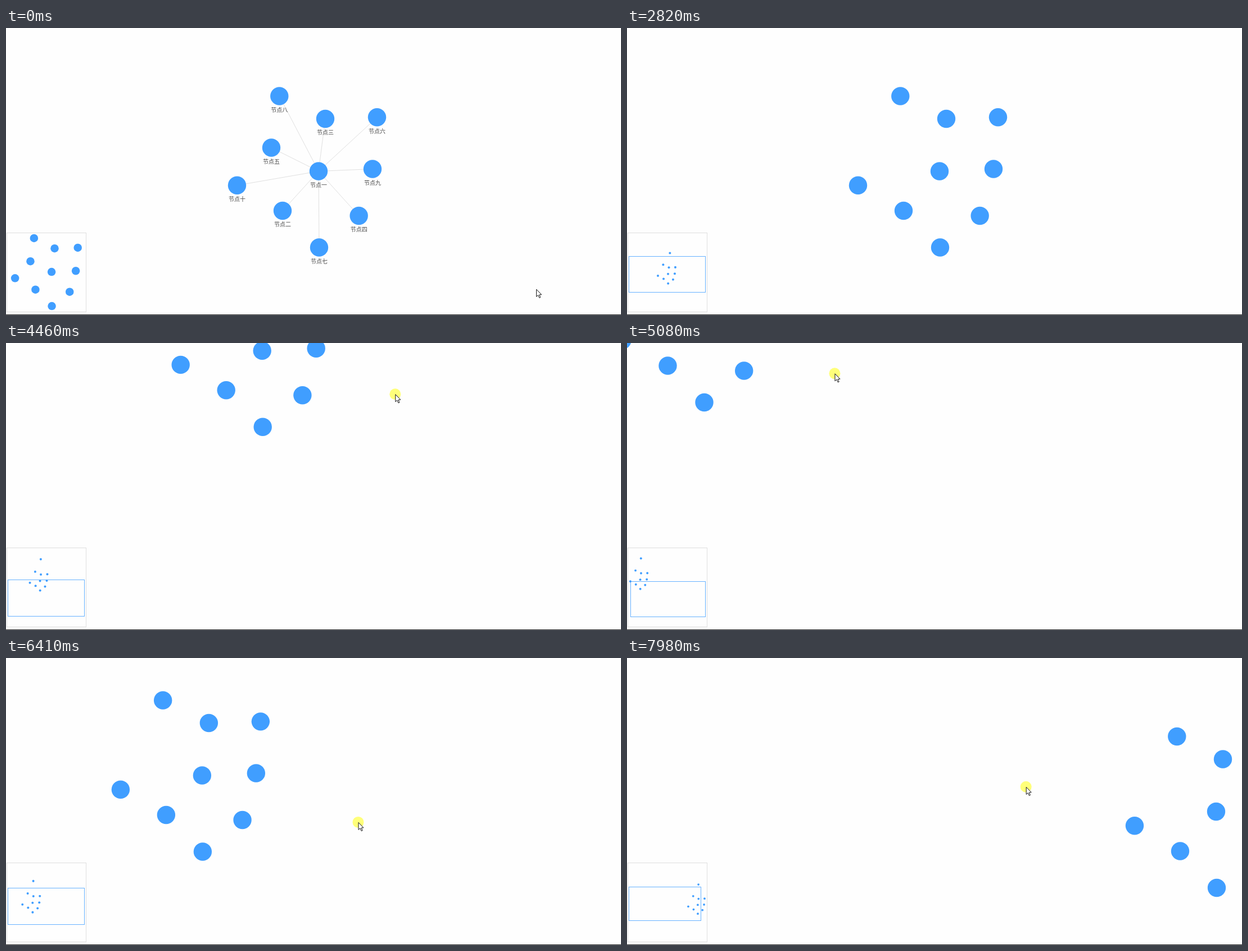
An HTML page with a canvas for the animation above (8000 ms loop, 1094 by 512 pixels).

```html
<!DOCTYPE html>
<html lang="zh">
<head>
<meta charset="utf-8">
<title>节点图</title>
<style>
  html, body { margin: 0; width: 100%; height: 100%; overflow: hidden; background: #fefefe; }
  canvas { display: block; }
</style>
</head>
<body>
<canvas id="stage" width="1094" height="512"></canvas>
<script>
const ctx = document.getElementById('stage').getContext('2d');
const W = 1094, H = 512, VIEW_H = 519;
const LOOP = 8000, STEP = 78;
const R = 16.2, BLUE = '#409eff', PAPER = '#fefefe';

const nodes = [
  ['一', 556, 255.5], ['二', 492, 326], ['三', 568, 162], ['四', 627.7, 335],
  ['五', 472, 213.5], ['六', 660, 159.3], ['七', 557, 391.5], ['八', 486.3, 121.5],
  ['九', 652, 251.5], ['十', 411, 280.7]
];

// Turning points of the pointer: time, x, y
const path = [
  [0, 943.5, 466], [900, 430, 160], [1345, 407.5, 167], [1530, 472, 213.5],
  [1900, 500, 377], [2600, 564, 60], [2808, 583, -45], [3130, 566.5, -57],
  [3430, 566.5, -57], [3830, 795.5, 337.5], [3950, 795.5, 337.5],
  [4212, 718, 148], [4446, 695.2, 95.7], [4680, 590, 18], [5070, 376, 52],
  [5616, 177.5, 241.2], [5900, 120, 275], [6130, 120, 275],
  [6630, 974.8, 305.2], [6790, 974.8, 305.2], [7040, 690, 27],
  [7320, 397, 179], [7420, 397, 179], [7956, 709.7, 229.8], [LOOP, 709.7, 229.8]
];

const nodeDrag = { name: '五', from: 1530, to: 3430 };
const canvasDrags = [{ from: 3830, to: 6760 }, { from: 7325, to: LOOP }];
const drags = [nodeDrag, ...canvasDrags];
const GRIP = 150;        // pause between pressing and moving
const LAG = 15;          // content trails the pointer

const clamp = (v, lo, hi) => Math.min(hi, Math.max(lo, v));
const slope = (i, axis) =>
  (path[i + 1][axis] - path[i][axis]) / (path[i + 1][0] - path[i][0]);

// Tangent of a monotone spline: flat at turning points and rests
function tangent(i, axis) {
  if (i === 0 || i === path.length - 1) return 0;
  const a = slope(i - 1, axis), b = slope(i, axis);
  return a * b > 0 ? 2 * a * b / (a + b) : 0;
}

function pointer(time) {
  const t = clamp(time, 0, LOOP);
  const i = Math.max(0, path.findIndex(k => k[0] >= t) - 1);
  const span = path[i + 1][0] - path[i][0];
  const u = (t - path[i][0]) / span, v = 1 - u;
  return [1, 2].map(axis =>
    path[i][axis] * v * v * (1 + 2 * u) + path[i + 1][axis] * u * u * (1 + 2 * v) +
    span * u * v * (tangent(i, axis) * v - tangent(i + 1, axis) * u));
}

function shift(drag, t) {
  const [x0, y0] = pointer(drag.from);
  const [x, y] = pointer(clamp(t, drag.from, drag.to));
  return [x - x0, y - y0];
}

function layout(t) {
  const pans = canvasDrags.map(d => shift(d, t));
  return nodes.map(([name, x, y]) => {
    const moves = name === nodeDrag.name ? [...pans, shift(nodeDrag, t)] : pans;
    for (const [dx, dy] of moves) { x += dx; y += dy; }
    return { name, x, y };
  });
}

function disc(x, y, r, color) {
  ctx.fillStyle = color;
  ctx.beginPath();
  ctx.arc(x, y, r, 0, Math.PI * 2);
  ctx.fill();
}

function drawGraph(items, detailed) {
  if (detailed) {
    ctx.strokeStyle = '#e0e0e0';
    ctx.lineWidth = 1;
    ctx.beginPath();
    for (const n of items.slice(1)) {
      ctx.moveTo(items[0].x, items[0].y);
      ctx.lineTo(n.x, n.y);
    }
    ctx.stroke();
  }
  ctx.font = '10px "Noto Sans CJK SC", "Noto Sans CJK", sans-serif';
  ctx.textAlign = 'center';
  ctx.textBaseline = 'middle';
  for (const n of items) {
    disc(n.x, n.y, R, BLUE);
    if (!detailed) continue;
    ctx.fillStyle = '#444';
    ctx.fillText('节点' + n.name, n.x, n.y + 24.7);
  }
}

// Fits the nodes, or nodes and viewport together once a node leaves the view
function drawMinimap(items) {
  const pad = R + 0.5;
  const xs = items.map(n => n.x), ys = items.map(n => n.y);
  let left = Math.min(...xs) - pad, right = Math.max(...xs) + pad;
  let top = Math.min(...ys) - pad, bottom = Math.max(...ys) + pad;
  const inside = left >= 0 && right <= W && top >= 0 && bottom <= VIEW_H;
  if (!inside) {
    left = Math.min(left, 0);
    right = Math.max(right, W);
    top = Math.min(top, 0);
    bottom = Math.max(bottom, VIEW_H);
  }
  const k = 136 / Math.max(right - left, bottom - top);
  const mapX = x => 71.9 + (x - (left + right) / 2) * k;
  const mapY = y => 435.5 + (y - (top + bottom) / 2) * k;

  ctx.fillStyle = PAPER;
  ctx.fillRect(1, 365, 142, 142);
  ctx.lineWidth = 1;
  ctx.strokeStyle = '#dedede';
  ctx.strokeRect(1.5, 365.5, 141, 141);
  for (const n of items) disc(mapX(n.x), mapY(n.y), R * k, BLUE);
  if (inside) return;
  const snap = v => Math.floor(v) + 0.5;
  const x = snap(mapX(0)), y = snap(mapY(0));
  ctx.strokeStyle = 'rgba(64,158,255,.8)';
  ctx.strokeRect(x, y, snap(mapX(W)) - x, snap(mapY(VIEW_H)) - y);
}

function drawPointer([x, y], down) {
  if (down) disc(x, y, 10, 'rgba(255,255,0,.52)');
  ctx.save();
  ctx.translate(x + 0.5, y + 0.5);
  const arrow = new Path2D('M0 0V13L3 10.3 5.2 15.2 7.2 14.3 5.1 9.7 9 9.4Z');
  ctx.fillStyle = '#fff';
  ctx.fill(arrow);
  ctx.strokeStyle = '#111';
  ctx.lineWidth = 1;
  ctx.stroke(arrow);
  ctx.restore();
}

function draw(now) {
  const t = Math.floor((now % LOOP) / STEP) * STEP;
  const pressed = drags.some(d => t >= d.from && t < d.to);
  const moving = drags.some(d => t >= d.from + GRIP && t < d.to);
  const items = layout(t);
  ctx.fillStyle = PAPER;
  ctx.fillRect(0, 0, W, H);
  drawGraph(items, !moving);
  drawMinimap(items);
  drawPointer(pointer(t + LAG), pressed);
  ctx.fillStyle = '#222';
  ctx.fillRect(0, H - 1, W, 1);
}

const start = performance.now();
function loop() {
  draw(performance.now() - start);
  requestAnimationFrame(loop);
}
loop();
</script>
</body>
</html>
```
